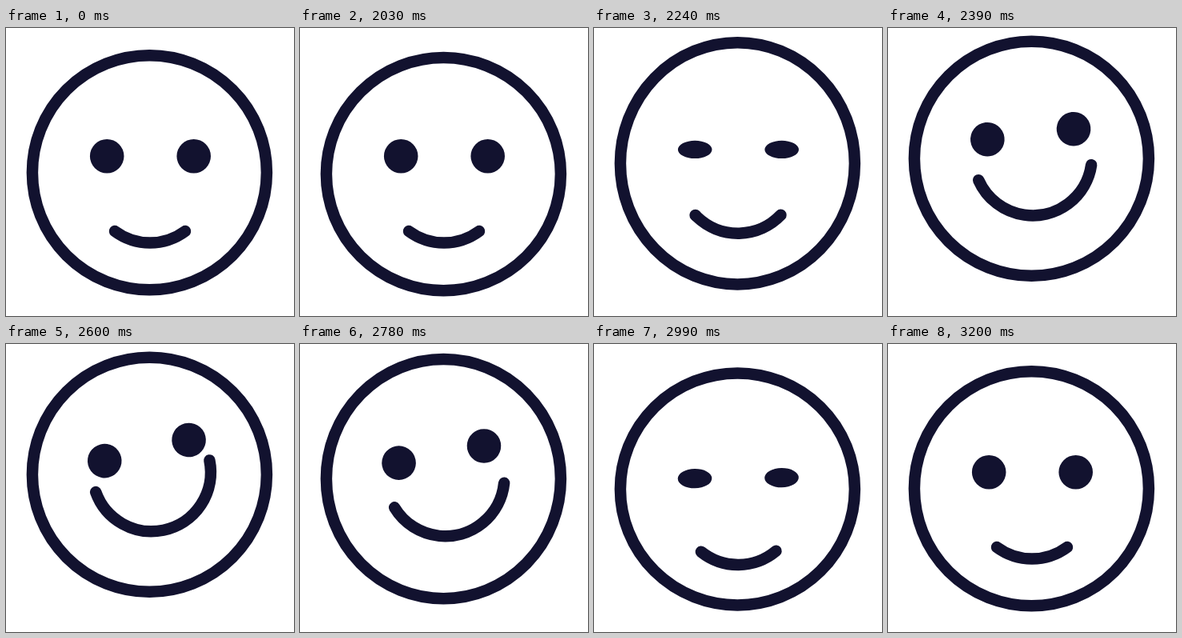
Animation of 360 by 360 pixels, one loop 3830 ms. Source, as an HTML page with a canvas:

```html
<!DOCTYPE html>
<html>
<head>
<meta charset="utf-8">
<style>
  html, body { margin: 0; height: 100%; overflow: hidden; background: #fff; }
  canvas { display: block; }
</style>
</head>
<body>
<canvas id="stage" width="360" height="360"></canvas>
<script>
const ctx = document.getElementById('stage').getContext('2d');
const LOOP = 3830, STEP = 30, INK = '#12122f';
const EYE = 21.3, LAG = 30;

// Smoothstep from 0 to 1 between two times.
function ease(t, start, end) {
  const u = Math.min(1, Math.max(0, (t - start) / (end - start)));
  return u * u * (3 - 2 * u);
}
// Rises to 1, holds, and falls back to 0.
const hold = (t, a, b, c, d) => ease(t, a, b) - ease(t, c, d);
const bump = (t, a, peak, b) => hold(t, a, peak, peak, b);

// Crouch before and after the jump; the features trail the outline by a lag.
const crouch = (t, lag) =>
  bump(t, 2004 + lag, 2125 + lag, 2283 + lag) + bump(t, 2738, 2904 + lag, 3024 + lag);

function hop(t, height, lag) {
  const lift = hold(t, 2125 + lag, 2283 + lag, 2738, 2904 + lag);
  const rebound = bump(t, 2904 + lag, 3024 + lag, 3200);
  return 16 * crouch(t, lag) - height * lift - 3 * rebound;
}

const rad = deg => deg * Math.PI / 180;

function tilted(y, angle, paint) {
  ctx.save();
  ctx.translate(180, y);
  ctx.rotate(rad(angle));
  ctx.beginPath();
  paint();
  ctx.restore();
}

function draw(t) {
  const tilt = -13.9 * hold(t, 2232, 2550, 2682, 3032);
  const smile = 36.5 + 49.5 * hold(t, 2132, 2512, 2630, 3050);
  const blink = bump(t, 2060, 2150, 2345) + bump(t, 2800, 2900, 3080);
  const stretch = bump(t, 2125, 2235, 2350) + bump(t, 2715, 2815, 2904);

  ctx.clearRect(0, 0, 360, 360);
  ctx.fillStyle = ctx.strokeStyle = INK;
  ctx.lineCap = 'round';
  ctx.lineWidth = 14.5;

  ctx.beginPath();
  ctx.ellipse(179.4, 180.7 + hop(t, 17.5, 0), 146.5,
    146.5 + 6 * stretch - 7.5 * crouch(t, 0), 0, 0, 2 * Math.PI);
  ctx.stroke();

  tilted(179 + hop(t, 27.6, LAG), tilt, () => {
    for (const x of [-53.8, 54.7]) {
      ctx.moveTo(x + EYE, -18.8);
      ctx.ellipse(x, -18.8, EYE, EYE - 18.3 * blink, 0, 0, 2 * Math.PI);
    }
    ctx.fill();
  });

  tilted(187.5 + hop(t, 34, LAG), tilt * 1.12, () => {
    ctx.arc(0, 7, 74, rad(90 - smile), rad(90 + smile));
    ctx.stroke();
  });
}

function tick() {
  const t = performance.now() % LOOP;
  draw(Math.floor((t - 20) / STEP) * STEP + 20);
  requestAnimationFrame(tick);
}
tick();
</script>
</body>
</html>
```
